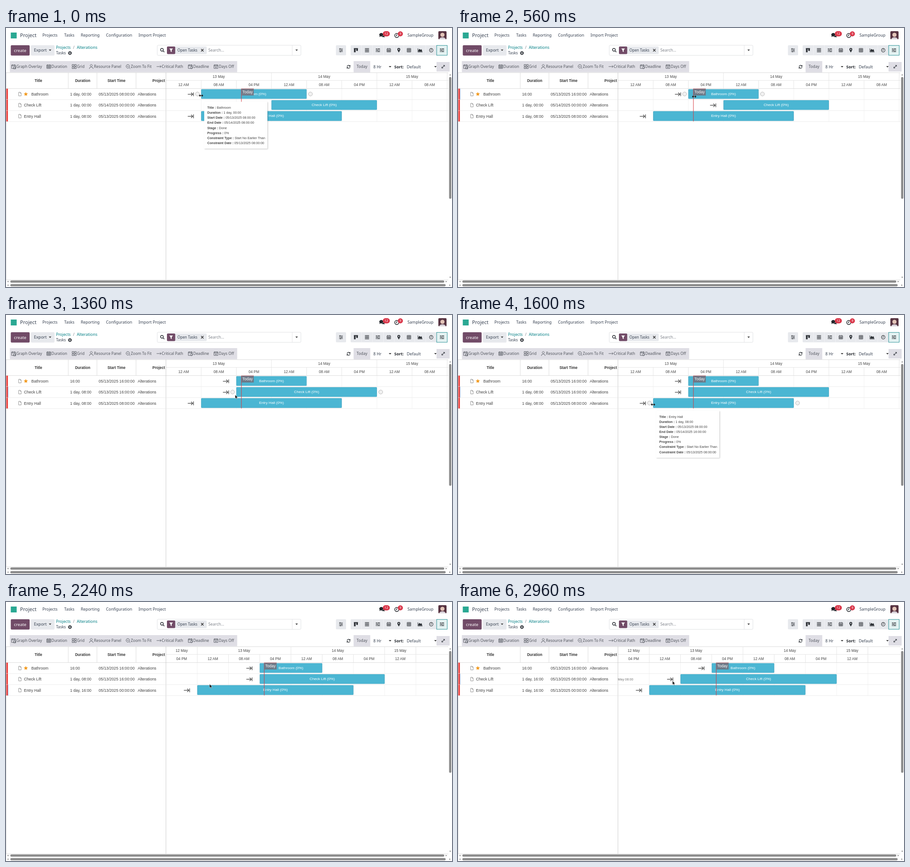
Recreate the animation shown at these times as an HTML page. Size 981x571 px, loop 3040 ms.

```html
<!DOCTYPE html>
<html lang="en">
<head>
<meta charset="utf-8">
<style>
html, body { margin: 0; width: 100%; height: 100%; overflow: hidden; background: #fff; }
svg { display: block; }
text { font-family: "Liberation Sans", Arial, sans-serif; }
.ui { font-family: "Noto Sans", "Open Sans", sans-serif; }
</style>
</head>
<body>
<svg width="981" height="571" viewBox="0 0 981 571">
  <defs>
    <clipPath id="lane"><rect x="352" y="98" width="621" height="457"/></clipPath>
    <clipPath id="face"><rect x="951" y="7" width="18" height="18" rx="2"/></clipPath>
    <filter id="soft" x="-10%" y="-10%" width="120%" height="125%"><feDropShadow dx="1" dy="1" stdDeviation="1" flood-opacity=".25"/></filter>
  </defs>
  <g id="frame"></g>
  <g id="live"></g>
</svg>
<script>
const LOOP = 3040, STEP = 80, LEFT = 352;
const PROJECT = 'Alterations';
const INK = '#3f434a', PALE = '#e7e9ed', BAND = '#dfdee5', PURPLE = '#714b67', TEAL = '#017e84';

// Drawing helpers: text is centred on y.
const text = (x, y, s, size = 8.65, fill = '#414141', more = '') =>
  `<text x="${x}" y="${y + size * .355}" font-size="${size}" fill="${fill}" ${more}>${s}</text>`;
const ui = (x, y, s, size = 8.9, fill = '#374151', more = '') => text(x, y, s, size, fill, 'class="ui" ' + more);
const MID = 'text-anchor="middle"', BOLD = 'font-weight="700"';
const rect = (x, y, w, h, fill, more = '') => `<rect x="${x}" y="${y}" width="${w}" height="${h}" fill="${fill}" ${more}/>`;
const path = (d, color = INK, w = 1, x = 0, y = 0) =>
  `<path d="${d}" fill="none" stroke="${color}" stroke-width="${w}" transform="translate(${x} ${y})"/>`;
const solid = (d, x, y, fill = INK) => `<path d="${d}" fill="${fill}" transform="translate(${x} ${y})"/>`;
const circle = (x, y, r, fill, more = '') => `<circle cx="${x}" cy="${y}" r="${r}" fill="${fill}" ${more}/>`;
const caret = (x, y) => solid('M-2.8-1.4h5.6L0 1.6z', x, y, '#333');
const hline = (x1, x2, y, c = '#cecece') => path(`M${x1} ${y}H${x2}`, c, .7);
const vline = (x, y1, y2, c = '#cecece') => path(`M${x} ${y1}V${y2}`, c, .7);
const bars3 = (x, y, w, gap) => path([-1, 0, 1].map(i => `M${-w / 2} ${i * gap}h${w}`).join(''), '#2f3338', 1.5, x, y);

function header() {
  let s = rect(10.5, 10, 13, 13, '#2aa893') + ui(31, 16.3, 'Project', 11) +
    [[80, 'Projects'], [128, 'Tasks'], [164.5, 'Reporting'], [220, 'Configuration'], [291.5, 'Import Project']]
      .map(([x, w]) => ui(x, 16.3, w)).join('');

  // Messages, activities, company and avatar
  s += solid('M-6-1a4.5 3.7 0 1 1 3 3.3L-6 4l1-2.4zM4-2q4 3 1 5l1 2-3-1.2q-3 .4-4-1 5-.6 5-4.8z', 827, 16, '#22262b') +
    circle(859.5, 16.5, 4.4, 'none', 'stroke="#22262b" stroke-width="1.5"') + path('M0-2.5V.8h-2.2', '#22262b', 1.2, 859.6, 16) +
    rect(828.8, 7, 15.5, 11.4, '#d9374a', 'rx="5.7"') + rect(861.8, 7.3, 11.2, 11.2, '#d9374a', 'rx="5.6"') +
    ui(836.6, 12.6, '12', 7, '#fff', MID) + ui(867.4, 12.8, '9', 7, '#fff', MID) +
    ui(883, 16.3, 'SampleGroup') +
    `<g clip-path="url(#face)">${rect(951, 7, 18, 18, '#573341')}${circle(960, 15, 4.6, '#e3c4b8')}` +
    `<ellipse cx="960" cy="25" rx="7" ry="4.5" fill="#d9d3da"/></g>`;

  // Action row
  s += rect(10.5, 38, 41.5, 22.8, PURPLE, 'rx="2"') + ui(31.2, 49.2, 'create', 9.3, '#fff', MID + ' font-weight="500"') +
    rect(55, 38, 51.7, 22.8, PALE, 'rx="2"') + ui(61.5, 49.2, 'Export', 9.1, '#374151', 'font-weight="500"') + caret(97, 49) +
    ui(110, 43, 'Projects', 8.6, TEAL) + ui(147.5, 43, '/', 8.6, '#7b7f86') + ui(155.7, 43, PROJECT, 8.9, TEAL) +
    ui(110, 55, 'Tasks', 8.6) +
    circle(140.6, 55.2, 2.4, 'none', 'stroke="#2b2f35" stroke-width="1.7"') +
    circle(140.6, 55.2, 3.7, 'none', 'stroke="#2b2f35" stroke-width="1.3" stroke-dasharray="1.5 1.406"');

  // Search
  s += rect(332.7, 38, 316, 22.3, '#fff', 'rx="2" stroke="#d8dadd" stroke-width=".8"') + vline(629.5, 38, 60, '#d8dadd') +
    circle(343, 48, 3, 'none', 'stroke="#2b2f35" stroke-width="1.4"') + path('M345.3 50.3l3 3', '#2b2f35', 1.6) +
    rect(354, 40.7, 87.5, 16.8, PALE, 'rx="2"') + rect(354, 40.7, 18.2, 16.8, PURPLE, 'rx="2"') +
    solid('M-4-4h8L1.2-.4V4l-2.4-1.6V-.4z', 363.2, 49.2, '#fff') + ui(377, 49, 'Open Tasks', 8.2) +
    path('M-2.7-2.7l5.4 5.4m0-5.4l-5.4 5.4', '#333', 1.4, 431.8, 49) + ui(445, 49, 'Search...', 8.8, '#7c8088') + caret(639.3, 49);

  // View switcher
  s += rect(725.7, 38, 22.3, 22.3, PALE, 'rx="2"') +
    path('M-4-3h8M-4 0h8M-4 3h8M-2-4.4v2.8M2-1.4v2.8M-1 1.6v2.8', '#2f3338', 1.1, 736.7, 49) +
    rect(758, 38, 212.5, 22.3, PALE, 'rx="2"') +
    [782, 806, 830.5, 854, 875, 899, 923].map(x => vline(x, 38, 60.3, '#f6f7f8')).join('') +
    rect(947.2, 38.3, 23.2, 21.8, '#e4f2f2', `stroke="${TEAL}" stroke-width=".8"`) +
    path('M-4.5-3.6h9', '#2f3338', 2, 769.7, 49) + path('M-2.5-3.5v8M2.5-3.5v5', '#2f3338', 3.6, 769.7, 49) +
    path('M-4.5-3.6h9m-9 2.4h9m-9 2.4h9m-9 2.4h9', '#2f3338', 1.3, 794, 49) +
    bars3(818, 49, 9, 3.1) + bars3(959, 49, 9, 3.1) +
    [818, 959].map(x => path('M-1-4v2M2-1v2M-2 2v2', '#fff', .8, x, 49)).join('') +
    path('M-4-3.2h8v7h-8zM-4-1h8M-2-5v2M2-5v2M-4 1.4h8M-1.4-1v5M1.4-1v5', '#2f3338', .9, 842, 49) +
    solid('M0 5Q-3.2 0-3.2-1.8A3.2 3.2 0 0 1 3.2-1.8Q3.2 0 0 5zM0-3a1.2 1.2 0 1 0 .01 0z', 864, 49, '#2f3338') +
    path('M-4-4h8v8h-8zM-4-1.4h8M-4 1.3h8M-1.4-4v8M1.4-4v8', '#2f3338', .9, 886.3, 49) +
    path('M-5-4v8h10', '#2f3338', 1, 911, 49) + solid('M-4 3V0l2.4-3L1-.8 3-2.4 4.6 3z', 911, 49, '#2f3338') +
    circle(935.3, 49, 3.9, 'none', 'stroke="#2f3338" stroke-width="1.1"') + path('M0-2.4V.4h-2', '#2f3338', .9, 935.5, 49);
  return s;
}

function toolbar() {
  const cal = 'M-4.3-3.5h8.6v7.6h-8.6zM-4.3-1.4h8.6M-2.2-4.8v2.2M2.2-4.8v2.2';
  const items = [
    [16.5, cal + 'M0 1h5v4h-5z', 'Graph Overlay'],
    [94, cal + 'M-1.4-1.4v5.5M1.6-1.4v5.5M-4.3 1.3h8.6', 'Duration'],
    [150, 'M-4.5-4.5h3.7v3.7h-3.7zM.8-4.5h3.7v3.7H.8zM-4.5.8h3.7v3.7h-3.7zM.8.8h3.7v3.7H.8z', 'Grid'],
    [187.5, 'M0-4.6a2.3 2.3 0 1 0 .01 0M-4.3 5Q-4 1 0 1T4.3 5', 'Resource Panel'],
    [268.5, 'M-.5-4.4a3.9 3.9 0 1 0 .01 0M2.3 2.4L5 5M-2.5-.5h4', 'Zoom To Fit'],
    [336.3, 'M-5 0H5M2.4-2.4L5 0 2.4 2.4', 'Critical Path'],
    [405.3, cal + 'M2.6 0a2.4 2.4 0 1 0 .01 0', 'Deadline'],
    [461.8, cal + 'M-1.8.2l3.6 2.8m0-2.8l-3.6 2.8', 'Days Off']];
  const labelX = [22.8, 99.8, 156, 193.6, 274.6, 342.6, 411.8, 468];
  return rect(8.5, 73, 500, 24.5, BAND) +
    items.map(([x, d, s], i) => path(d, '#50545c', .9, x, 85) + ui(labelX[i], 85, s, 8.35, '#50545c')).join('') +
    path('M-3.3-.6A3.4 3.4 0 0 1 3-1.6M3.3.6A3.4 3.4 0 0 1-3 1.6', '#2f3338', 1.3, 753.5, 85.6) +
    solid('M4-4.2v3.6H.5zM-4 4.2V.6h3.5z', 753.5, 85.6, '#2f3338') +
    rect(764.6, 73, 36.6, 24.8, BAND) + ui(783, 85.4, 'Today', 8.5, '#50545c', MID) +
    ui(808, 85.6, '8 Hr', 8.9) + caret(844.8, 85.4) + ui(854, 85.6, 'Sort:', 8.9, '#22262b', BOLD) +
    ui(881.5, 85.6, 'Default', 9) + caret(944.6, 85.4) +
    rect(947, 75, 28.8, 21, BAND) + path('M-2.8 2.8L2.8-2.8M.2-3H3v2.8M-.2 3H-3V.2', '#3f434a', 1.1, 961.6, 85.3);
}

function gridFrame() {
  const thumb = (x, y, w, h) => rect(x, y, w, h, '#8b8b8b', 'rx="2.5"');
  const tri = (x, y, a) => `<path d="M-1.6 1.5L0-1.5 1.6 1.5z" fill="#777" transform="translate(${x} ${y}) rotate(${a})"/>`;
  return hline(0, 973, 98.5) + hline(0, 973, 133.5) + hline(LEFT, 973, 115.5, '#dcdcdc') + hline(0, 973, 555.3) +
    vline(.4, 98, 555) + [137, 200, 286].map(x => vline(x, 98, 133)).join('') + vline(351.8, 98, 555, '#b9b9b9') +
    text(71.3, 116, 'Title', 8.17, '#333', MID + BOLD) + text(168.7, 116, 'Duration', 8.17, '#333', MID + BOLD) +
    text(243, 116, 'Start Time', 8.17, '#333', MID + BOLD) + text(322, 116, 'Project', 8.17, '#333', BOLD) +
    thumb(974.6, 108, 5, 268.5) + tri(977, 103, 0) + tri(977, 550, 180) +
    thumb(9.5, 556.4, 954.5, 5) + tri(4, 559, -90) + tri(968.5, 559, 90) +
    thumb(9.5, 564.5, 957.5, 5) + tri(4, 567, -90) + tri(976.5, 567, 90);
}

// Hours count from 13 May 00:00.
const TASKS = [
  { name: 'Bathroom', start: 8, end: 32 },
  { name: 'Check Lift', start: 24, end: 48, deadline: '05/02/2025 17:38:38' },
  { name: 'Entry Hall', start: 8, end: 40 }];
const NOW = 17.16, RESCALE = 2080;
const DRAGS = [[0, 80, 520, 16], [1, 880, 1360, 16], [2, 1680, RESCALE, 0], [1, 2560, 2920, 8]]; // row, from, until, new start
const HOVERS = [[0, 0, 680], [1, 720, 1400], [2, 1520, RESCALE], [1, 2320, 2900]];
const TIPS = [[0, 0, 160, 436, 162.6], [1, 800, 1120, 589.8, 183.2], [2, 1520, 1760, 436, 211.3], [1, 2400, 2640, 559.2, 177.8]];
// time, x, y, resize pointer from here on
const POINTER = [
  [0, 429, 149, 1], [80, 430, 149, 1], [320, 485, 150, 1], [480, 518, 151, 1], [560, 519.5, 151.3, 1], [620, 525, 153, 0],
  [800, 583, 172, 1], [880, 583, 172, 1], [920, 580, 172, 0], [960, 576.392, 173, 0], [1040, 555, 174.5, 0],
  [1240, 510, 176, 0], [1360, 504, 176, 0], [1520, 429, 197.5, 1], [1680, 429, 197.5, 1], [1720, 415, 197, 0],
  [1840, 360.2889, 196, 0], [1920, 342.6, 195.6, 0], [RESCALE, 341, 195.6, 0], [2400, 554.5, 166.3, 1],
  [2560, 554.5, 166.3, 1], [2620, 540, 168, 0], [2840, 474, 173.5, 0], [2900, 471.8, 174, 0], [LOOP, 471.8, 174, 0]];

const active = (list, t) => list.find(([, a, b]) => t >= a && t < b);
const rowY = i => 145.7 + 24.3 * i;
const pad = n => String(n).padStart(2, '0');

function pointerAt(t) {
  const i = Math.max(0, POINTER.findLastIndex(k => k[0] <= t));
  const a = POINTER[i], b = POINTER[i + 1] || a, f = (t - a[0]) / (b[0] - a[0] || 1);
  return { x: a[1] + (b[1] - a[1]) * f, y: a[2] + (b[2] - a[2]) * f, resize: a[3] };
}
function stamp(h) {
  const s = Math.round(h * 3600), day = Math.floor(s / 86400), r = s - day * 86400;
  return { day: 13 + day, h: pad(Math.floor(r / 3600)), m: pad(Math.floor(r / 60) % 60), s: pad(r % 60) };
}
function date(h) {
  const d = stamp(h);
  return `05/${d.day}/2025 ${d.h}:${d.m}:${d.s}`;
}
function duration(h) {
  const d = stamp(h);
  return (d.day > 13 ? `${d.day - 13} day, ` : '') + `${d.h}:${d.m}`;
}

function scale(first, cell) {
  const x = i => LEFT + i * cell;
  let s = '', from = 0;
  for (let i = 0; i < 8; i++) {
    const hour = first + i * 8, next = hour + 8;
    s += text(x(i + .5), 124.8, ['12 AM', '08 AM', '04 PM'][(hour + 24) % 24 / 8], 8.17, '#444', MID) +
      vline(x(i + 1), 116, 133, '#dcdcdc') + vline(x(i + 1), 134, 206.3, '#ececec');
    if (next % 24 === 0 || i === 7) {
      s += text(x((from + i + 1) / 2), 107.2, `${13 + Math.floor(hour / 24)} May`, 8.17, '#444', MID) + vline(x(i + 1), 99, 115, '#dcdcdc');
      from = i + 1;
    }
  }
  return s;
}

function tooltip(task, x, y) {
  const lines = [['Title', task.name], ['Duration', duration(task.end - task.fixed)], ['Start Date', date(task.fixed)],
    ['End Date', date(task.end)], ['Stage', 'Done'], ['Deadline', task.deadline], ['Progress', '0%'],
    ['Constraint Type', 'Start No Earlier Than'], ['Constraint Date', date(task.fixed)]].filter(l => l[1]);
  return rect(x, y, 139, lines.length * 11.1 + 14.5, '#fff', 'filter="url(#soft)"') +
    lines.map(([k, v], i) => text(x + 6.8, y + 13 + i * 11.1, `<tspan ${BOLD}>${k} : </tspan>${v}`, 7.15, '#444')).join('');
}

function pointer({ x, y, resize }) {
  return resize
    ? path('M-3 0h6', '#fff', 2.4, x, y) + solid('M-4.8 0l3-2.8v2.1h3.6v-2.1l3 2.8-3 2.8V.7h-3.6v2.1z', x, y, '#111')
    : `<path d="M0 0v8.2l1.9-1.7 1.3 3 1.4-.6-1.3-2.9h2.6z" fill="#111" stroke="#fff" stroke-width=".5" transform="translate(${x} ${y})"/>`;
}

function live(t) {
  const wide = t < RESCALE, cell = wide ? 77.3 : 68.7, first = wide ? 0 : -8;
  const px = h => LEFT + (h - first) * cell / 8;
  const mouse = pointerAt(t), hover = active(HOVERS, t), tip = active(TIPS, t);
  const tasks = TASKS.map(k => ({ ...k, fixed: k.start }));
  let selected = -1;
  for (const [row, a, b, to] of DRAGS) {
    if (t < a) break;
    const k = tasks[row];
    selected = row;
    if (t >= b) k.start = k.fixed = to;
    else k.start = k.fixed + (pointerAt(Math.max(a, t - STEP)).x - pointerAt(a).x) * 8 / cell; // the bar trails the pointer
  }

  let grid = '', lane = scale(first, cell), marks = '';
  tasks.forEach((k, i) => {
    const y = rowY(i), x = px(k.start), end = px(k.end), mark = px(k.fixed) - 23;
    if (mouse.x < LEFT && Math.abs(mouse.y - y) < 12) grid += rect(1, y - 12, 350.6, 24.2, '#fff1a0');
    grid += rect(.8, y - 12, 3.4, 24, '#ee3f3b') + hline(0, 973, y + 12.1, '#e4e4e4');
    if (i === selected) grid += rect(4.2, y - 12, 1.1, 24, '#9fb2dc');
    grid += path('M-2.6-4h3.4l2 2v6h-5.4zM.8-4v2h2', '#777', .8, 30.5, y);
    if (!i) grid += solid('M0-4.6l1.3 3 3.3.3-2.5 2.1.8 3.2L0 2.3-2.9 4l.8-3.2-2.5-2.1 3.3-.3z', 43.6, y, '#f29a1f');
    grid += text(i ? 39.5 : 55.8, y + .2, k.name) + text(141, y + .2, duration(k.end - k.start)) +
      text(203.8, y + .2, date(k.start)) + text(289.8, y + .2, PROJECT);

    lane += rect(x + .3, y - 10.5, end - x - .6, 20.6, '#4bb6d3', 'rx="1" stroke="#3a9fbd" stroke-width=".7"') +
      text((x + end) / 2, y - .7, `${k.name} (0%)`, 8.1, '#fff', MID);
    marks += path('M-6.5 0H4.5M.8-3.6L4.6 0 .8 3.6M6.2-4.2v8.4', '#444', 1.2, mark, y + .4);
    if (Math.abs(mouse.x - mark) < 8 && Math.abs(mouse.y - y) < 10) {
      const d = stamp(k.fixed);
      marks += text(mark - 125, y + .8, `${d.day} May ${d.h}:${d.m}`, 7.3, '#777');
    }
    if (hover && hover[0] === i)
      marks += [x - 8.2, end + 8.4].map(c => circle(c, y - .2, 4.4, '#eee', 'fill-opacity=".8" stroke="#aaa" stroke-width=".8"')).join('');
  });

  const now = px(NOW);
  marks += path(`M${now} 134V206`, '#d8393f', 1) + rect(now, 133.8, 27.2, 15, '#73707d', 'fill-opacity=".86"') +
    hline(now, now + 27.2, 134.2, '#c4525c') + text(now + 13.6, 141.2, 'Today', 8.5, '#fff', MID);
  return grid + `<g clip-path="url(#lane)">${lane}${marks}</g>` +
    (tip ? tooltip(tasks[tip[0]], tip[3], tip[4]) : '') + pointer(mouse);
}

document.getElementById('frame').innerHTML = header() + toolbar() + gridFrame();
const stage = document.getElementById('live');
const begin = performance.now();
let shown = -1;
function draw() {
  const t = Math.floor((performance.now() - begin) % LOOP / STEP) * STEP;
  if (t !== shown) stage.innerHTML = live(shown = t);
  requestAnimationFrame(draw);
}
draw();
</script>
</body>
</html>
```
